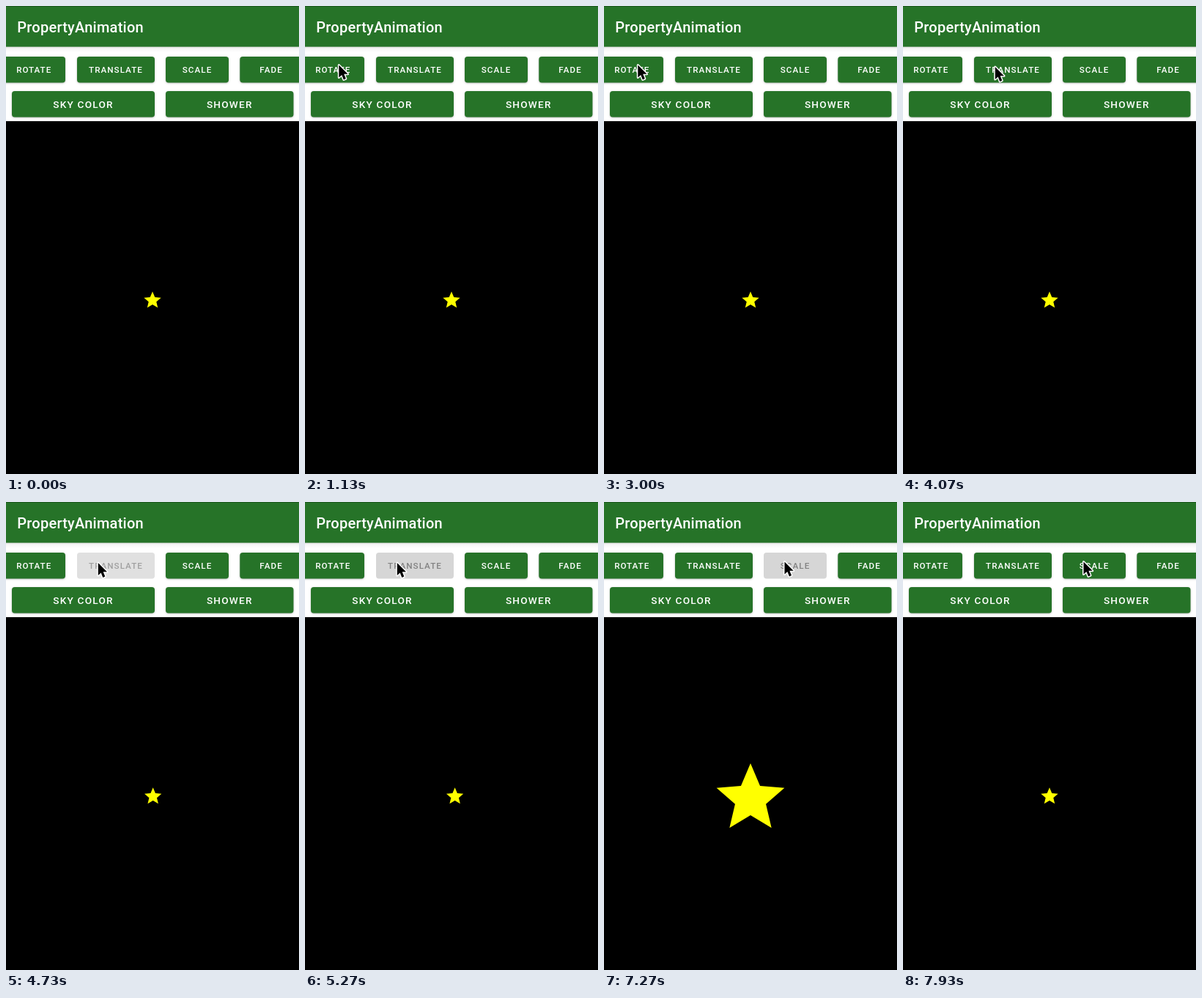
An HTML page with a canvas for the animation above (8 s loop, 400 by 638 pixels).

```html
<!DOCTYPE html>
<html lang="en">
<head>
<meta charset="utf-8">
<title>PropertyAnimation</title>
<style>
  html, body { margin: 0; width: 100%; height: 100%; overflow: hidden; background: #000; }
  canvas { display: block; width: 400px; height: 638px; }
</style>
</head>
<body>
<canvas id="stage"></canvas>
<script>
const W = 400, H = 638, LOOP = 8000, FPS = 15;
const GREEN = '#267328';
const canvas = document.getElementById('stage');
const ctx = canvas.getContext('2d');
const dpr = window.devicePixelRatio || 1;
canvas.width = W * dpr;
canvas.height = H * dpr;

const clamp = x => Math.min(1, Math.max(0, x));
const ease = x => (1 - Math.cos(Math.PI * clamp(x))) / 2;
const lerp = (a, b, u) => a + (b - a) * u;

const BUTTONS = [
  { label: 'ROTATE', x: -4.5, y: 69, w: 85.5, size: 11.66 },
  { label: 'TRANSLATE', x: 97, y: 69, w: 106, size: 11.66 },
  { label: 'SCALE', x: 218, y: 69, w: 86, size: 11.66 },
  { label: 'FADE', x: 319.3, y: 69, w: 85.5, size: 11.66 },
  { label: 'SKY COLOR', x: 8, y: 116, w: 195, size: 13.6 },
  { label: 'SHOWER', x: 218, y: 116, w: 174.5, size: 13.6 }
];
const BUTTON_H = 35.5;

// The press starts at `press`; the star's animation follows CLICK_DELAY later.
const CLICK_DELAY = 182, RING_TIME = 130;
const CLICKS = {
  ROTATE: { press: 1733, length: 1000 },
  TRANSLATE: { press: 4533, length: 600 },
  SCALE: { press: 6800, length: 600 }
};

const MOVES = [
  { start: 0, end: 870, from: [-18, 92], to: [46.3, 80.5] },
  { start: 3533, end: 4067, from: [46.3, 80.5], to: [125.8, 83] },
  { start: 5867, end: 6600, from: [125.8, 83], to: [246.5, 81.5] }
];

const STAR = [[12, 17.27], [18.18, 21], [16.54, 13.97], [22, 9.24], [14.81, 8.63],
  [12, 2], [9.19, 8.63], [2, 9.24], [7.46, 13.97], [5.82, 21]];
const ARROW = [[0, 0], [0, 17], [3.9, 13.4], [6.5, 19.9], [9.5, 18.6], [6.9, 12.3], [12.2, 12.3]];

function polygon(points) {
  ctx.beginPath();
  points.forEach(([x, y]) => ctx.lineTo(x, y));
  ctx.closePath();
}

function text(str, x, y, size, spacing, color, align) {
  ctx.font = `500 ${size}px Roboto, sans-serif`;
  ctx.letterSpacing = `${size * spacing}px`;
  ctx.textAlign = align;
  ctx.fillStyle = color;
  ctx.fillText(str, x, y);
}

function progress(name, t) {
  const { press, length } = CLICKS[name];
  return clamp((t - press - CLICK_DELAY) / length);
}

// There and back again, eased on both legs.
function pingPong(name, t) {
  const u = progress(name, t) * 2;
  return ease(u < 1 ? u : 2 - u);
}

function drawButton({ label, x, y, w, size }, t) {
  const click = CLICKS[label];
  const p = click ? progress(label, t) : 0;
  const disabled = p > 0 && p < 1;

  ctx.save();
  if (!disabled) {
    ctx.shadowColor = 'rgba(0,0,0,0.28)';
    ctx.shadowBlur = 2.5 * dpr;
    ctx.shadowOffsetY = 0.8 * dpr;
  }
  ctx.beginPath();
  ctx.roundRect(x, y, w, BUTTON_H, 4);
  ctx.fillStyle = disabled ? '#d6d6d6' : GREEN;
  ctx.fill();
  ctx.restore();

  text(label, x + w / 2, y + BUTTON_H / 2 + size * 0.37, size, 0.0893,
    disabled ? '#828282' : '#fff', 'center');

  if (!click) return;
  const since = t - click.press;
  const ripple = clamp((since - 50) / 80) * clamp((450 - since) / 200);
  if (ripple > 0) {
    ctx.fillStyle = `rgba(255,255,255,${0.24 * ripple})`;
    ctx.fill(roundedPath(x, y, w));
  }
}

function roundedPath(x, y, w) {
  const path = new Path2D();
  path.roundRect(x, y, w, BUTTON_H, 4);
  return path;
}

function drawBars() {
  ctx.fillStyle = '#fff';
  ctx.fillRect(0, 0, W, 157);
  const shade = ctx.createLinearGradient(0, 55, 0, 63);
  shade.addColorStop(0, '#dcdcdc');
  shade.addColorStop(0.4, '#f6f6f6');
  shade.addColorStop(1, '#fff');
  ctx.fillStyle = shade;
  ctx.fillRect(0, 55, W, 8);
  ctx.fillStyle = GREEN;
  ctx.fillRect(0, 0, W, 55.6);
  ctx.fillStyle = '#1a561c';
  ctx.fillRect(0, 0, W, 1);
  text('PropertyAnimation', 15.3, 36.3, 20, 0.0125, '#fff', 'left');
}

function drawStar(t) {
  const turn = ease(progress('ROTATE', t)) * 2 * Math.PI;
  const scale = 1.165 * (1 + 3 * pingPong('SCALE', t));
  ctx.save();
  ctx.translate(200 + 74 * pingPong('TRANSLATE', t), 400.3);
  ctx.rotate(turn);
  ctx.scale(scale, scale);
  ctx.translate(-12, -11.5);
  polygon(STAR);
  ctx.fillStyle = '#ff0';
  ctx.fill();
  ctx.restore();
}

function cursorAt(t) {
  const move = MOVES.filter(m => t >= m.start).pop();
  const u = ease((t - move.start) / (move.end - move.start));
  return move.from.map((v, i) => lerp(v, move.to[i], u));
}

function drawRing(x, y) {
  ctx.beginPath();
  ctx.arc(x, y, 28, 0, 2 * Math.PI);
  ctx.strokeStyle = '#fff';
  ctx.lineWidth = 4;
  ctx.stroke();
  ctx.strokeStyle = '#000';
  ctx.lineWidth = 2;
  ctx.stroke();
}

function drawCursor(t) {
  const [x, y] = cursorAt(t);
  const pressed = Object.values(CLICKS)
    .some(c => t >= c.press - 1 && t < c.press + RING_TIME);
  if (pressed) drawRing(x - 0.2, y + 0.5);
  ctx.save();
  ctx.translate(x, y);
  polygon(ARROW);
  ctx.lineJoin = 'round';
  ctx.lineWidth = 3;
  ctx.strokeStyle = '#fff';
  ctx.stroke();
  ctx.fillStyle = '#000';
  ctx.fill();
  ctx.restore();
}

function draw(now) {
  const t = Math.floor(((now % LOOP) + 4) * FPS / 1000) * 1000 / FPS;
  ctx.setTransform(dpr, 0, 0, dpr, 0, 0);
  ctx.fillStyle = '#000';
  ctx.fillRect(0, 0, W, H);
  drawStar(t);
  drawBars();
  BUTTONS.forEach(b => drawButton(b, t));
  drawCursor(t);
}

const began = performance.now();
function tick() {
  draw(performance.now() - began);
  requestAnimationFrame(tick);
}
tick();
</script>
</body>
</html>
```
